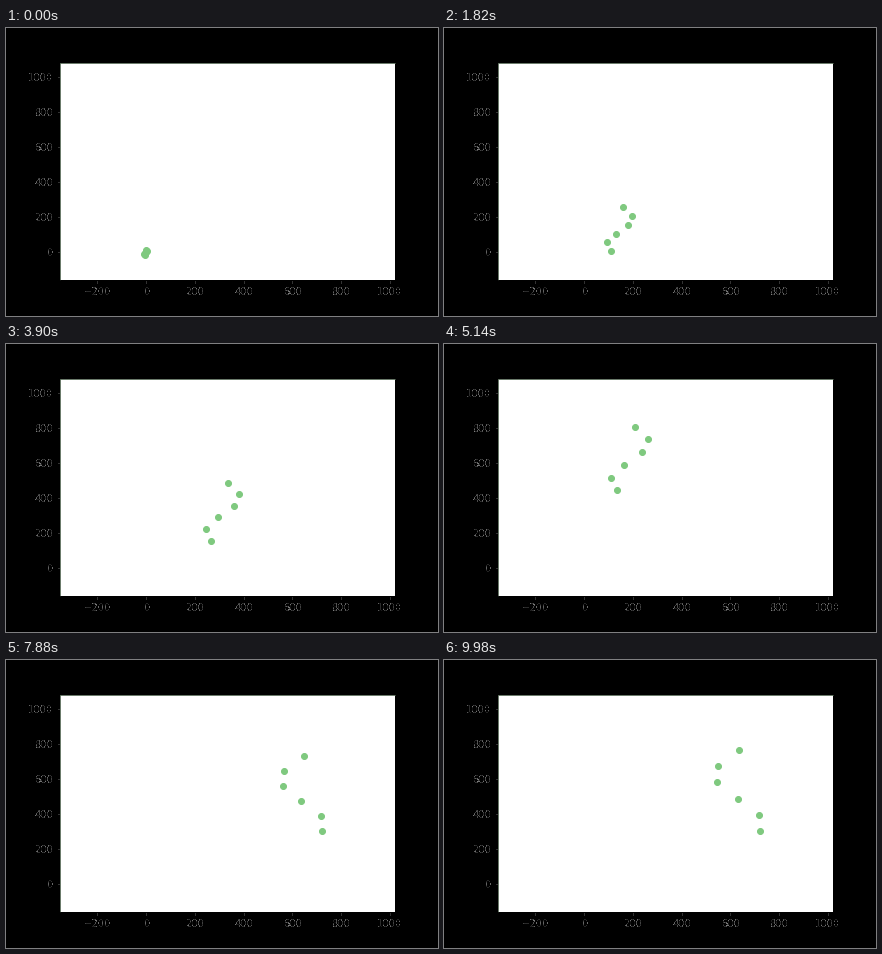
Animation of 432 by 288 pixels, one loop 10000 ms. Source, as a matplotlib script:

```python
import numpy as np
import matplotlib.pyplot as plt
from matplotlib.animation import FuncAnimation
from matplotlib.transforms import IdentityTransform

W, H, DPI = 432, 288, 72
FRAMES, STEP = 500, 20
DOTS = 6

# Route of the swarm's centre: time (s), x, y in pixels from the top left.
ROUTE = np.array([
    (0.00, 140, 225), (0.45, 98, 203), (0.94, 135, 192), (2.04, 193, 205),
    (2.62, 261, 211), (3.20, 272, 180), (4.08, 205, 164), (5.14, 186, 115),
    (5.70, 215, 84), (6.60, 307, 103), (7.30, 342, 140), (7.88, 297, 134),
    (8.35, 262, 133), (9.18, 285, 133), (9.60, 311, 135), (9.98, 295, 131),
])


def smoothstep(t, start, end):
    s = np.clip((t - start) / (end - start), 0, 1)
    return s * s * (3 - 2 * s)


def spline(t, keys, vals):
    """Cubic Hermite curve through vals at the given keys."""
    slope = np.gradient(vals, keys, axis=0)
    i = np.clip(np.searchsorted(keys, t, side="right") - 1, 0, len(keys) - 2)
    h = (keys[i + 1] - keys[i])[:, None]
    s = (t - keys[i])[:, None] / h
    return ((1 + 2 * s) * (1 - s) ** 2 * vals[i]
            + s * (1 - s) ** 2 * h * slope[i]
            + s ** 2 * (3 - 2 * s) * vals[i + 1]
            + s ** 2 * (s - 1) * h * slope[i + 1])


def swarm_paths():
    """Dot positions for all frames: a wavy column that spreads with time."""
    t = np.arange(FRAMES) * STEP / 1000
    centre = spline(t, ROUTE[:, 0], ROUTE[:, 1:]) - 0.5
    spread = (0.06 + 0.94 * (t / 10) ** 0.4)[:, None]
    phase = (0.3 + 2.8 * smoothstep(t, 5, 8))[:, None]
    i = np.arange(DOTS)
    x = centre[:, :1] + 24 * spread * np.sin(np.pi * i / 3 + phase)
    y = centre[:, 1:] + 41 * spread * np.linspace(-1, 1, DOTS)
    return np.stack([x, H - y], axis=2)


def soft_edges(img, dpi):
    """Keep the mostly covered pixels, lighter where coverage is partial."""
    alpha = img[..., 3:]
    solid = (alpha > 0.5).astype(float)
    return np.concatenate([np.repeat(1 - alpha, 3, axis=2), solid], axis=2), 0, 0


paths = swarm_paths()

fig = plt.figure(figsize=(W / DPI, H / DPI), dpi=DPI, facecolor="black")
fig.subplots_adjust(left=0.125, right=0.9, bottom=0.125, top=0.88)
ax = fig.add_subplot()
ax.set(xlim=(-353, 1020), ylim=(-160, 1082),
       xticks=range(-200, 1001, 200), yticks=range(0, 1001, 200))
ax.spines[["left", "top"]].set_color("#465a46")
for axis in (ax.xaxis, ax.yaxis):
    axis.set_agg_filter(soft_edges)

dots = ax.scatter([], [], s=36, color="#7fc97f", transform=IdentityTransform())
dots.set_offset_transform(IdentityTransform())


def update(n):
    dots.set_offsets(paths[n])
    return dots,


anim = FuncAnimation(fig, update, frames=FRAMES, interval=STEP,
                     repeat=True, repeat_delay=0)
plt.show()
```
